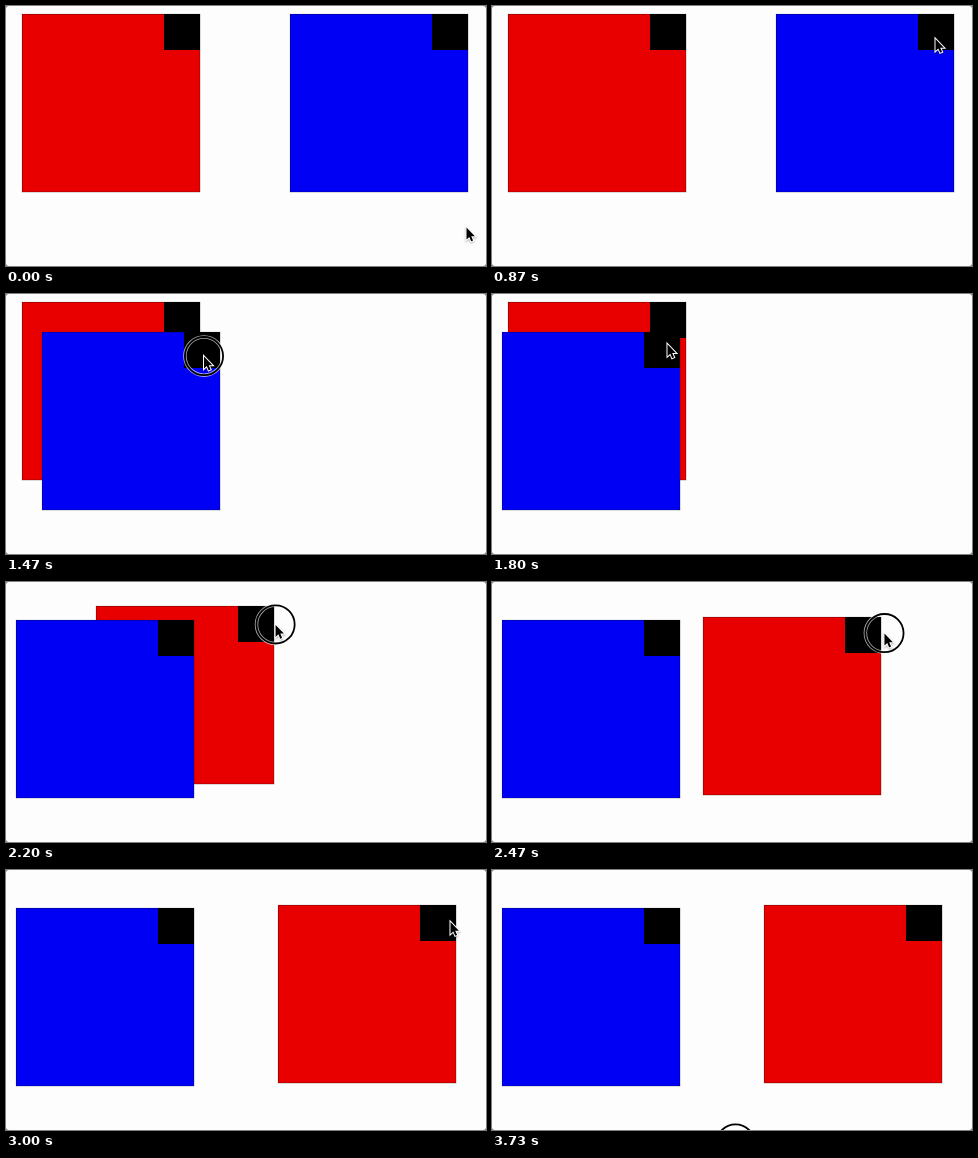
Animation, 480 px wide and 260 px high, one loop 3.79 s. Source, as an HTML page with a canvas:

```html
<!DOCTYPE html>
<html lang="en">
<head>
<meta charset="utf-8">
<title>Dragging two squares</title>
<style>
  html, body { margin: 0; width: 100%; height: 100%; overflow: hidden; background: #777; }
  canvas { display: block; width: 480px; height: 260px; }
</style>
</head>
<body>
<canvas id="stage" width="480" height="260"></canvas>
<script>
const ctx = document.getElementById('stage').getContext('2d');
const LOOP = 3790, STEP = 200 / 3, SIZE = 178, HANDLE = 36;

const smooth = u => u * u * (3 - 2 * u);
const easeOut = u => 1 - (1 - u) ** 1.5;

// A curved move: a bend above 1 lets y arrive sooner than x
function move(start, end, from, to, ease, bend) {
  const at = t => {
    const e = ease(Math.min(1, Math.max(0, (t - start) / (end - start))));
    return [
      from[0] + (to[0] - from[0]) * e,
      from[1] + (to[1] - from[1]) * (1 - (1 - e) ** bend)
    ];
  };
  return { start, at };
}

const blueMove = move(1083, 1560, [284, 8], [10, 38.4], smooth, 1.8);
const redMove = move(2067, 2720, [16, 8], [272, 35.4], easeOut, 2.6);

const blueGrip = [443, 32], blueDrop = [169, 62];
const redGrip = [186, 26], redDrop = [444, 51];
const turn = [405, 218], exit = [243, 273];
const pointerMoves = [
  move(40, 800, [460, 220.5], blueGrip, smooth, 1.5),
  move(1022, 1582, blueGrip, blueDrop, smooth, 1.9),
  move(1700, 1950, blueDrop, redGrip, smooth, 1),
  move(2056, 2687, redGrip, redDrop, easeOut, 2.6),
  move(3000, 3200, redDrop, turn, smooth, 1),
  move(3200, 3600, turn, exit, easeOut, 1.5)
];
const presses = [[1000, 1700], [1990, 2800], [3660, LOOP]];

const arrow = new Path2D('M0 0V12L2.8 9.4 4.7 13.8 6.6 13 4.7 8.7H8.4Z');

function pointerAt(t) {
  const current = pointerMoves.findLast(m => m.start <= t) || pointerMoves[0];
  return current.at(t);
}

function drawSquare(corner, color) {
  const [x, y] = corner.map(Math.round);
  ctx.fillStyle = color;
  ctx.fillRect(x, y, SIZE, SIZE);
  ctx.strokeStyle = 'rgba(0,0,0,.4)';
  ctx.lineWidth = 0.7;
  ctx.strokeRect(x + 0.2, y + 0.2, SIZE - 0.2, SIZE - 0.2);
  ctx.fillStyle = '#000';
  ctx.fillRect(x + SIZE - HANDLE, y, HANDLE, HANDLE);
}

function drawRing(x, y) {
  ctx.beginPath();
  ctx.arc(x + 0.5, y + 0.5, 19.1, 0, 7);
  for (const [color, width] of [['rgba(255,255,255,.65)', 3.5], ['#000', 1.8]]) {
    ctx.strokeStyle = color;
    ctx.lineWidth = width;
    ctx.stroke();
  }
}

function drawArrow(x, y) {
  ctx.save();
  ctx.translate(x + 0.5, y + 1);
  ctx.shadowColor = 'rgba(0,0,0,.3)';
  ctx.shadowBlur = 2;
  ctx.shadowOffsetY = 1;
  ctx.strokeStyle = '#fff';
  ctx.lineWidth = 2;
  ctx.stroke(arrow);
  ctx.shadowColor = 'transparent';
  ctx.fillStyle = '#000';
  ctx.fill(arrow);
  ctx.restore();
}

function draw(now) {
  // The picture advances at 15 steps per second
  const t = Math.round(Math.floor((now % LOOP + 3.4) / STEP) * STEP / 10) * 10;
  ctx.fillStyle = '#777';
  ctx.fillRect(0, 0, 480, 260);
  ctx.fillStyle = '#fefdfe';
  ctx.beginPath();
  ctx.roundRect(0, 0, 480, 260, 3);
  ctx.fill();

  drawSquare(redMove.at(t), '#e80000');
  drawSquare(blueMove.at(t), '#0000f5');

  const pointer = pointerAt(t);
  if (presses.some(([down, up]) => t >= down && t < up)) drawRing(...pointer);
  drawArrow(...pointer);
}

const start = performance.now();
function tick() {
  draw(performance.now() - start);
  requestAnimationFrame(tick);
}
tick();
</script>
</body>
</html>
```
